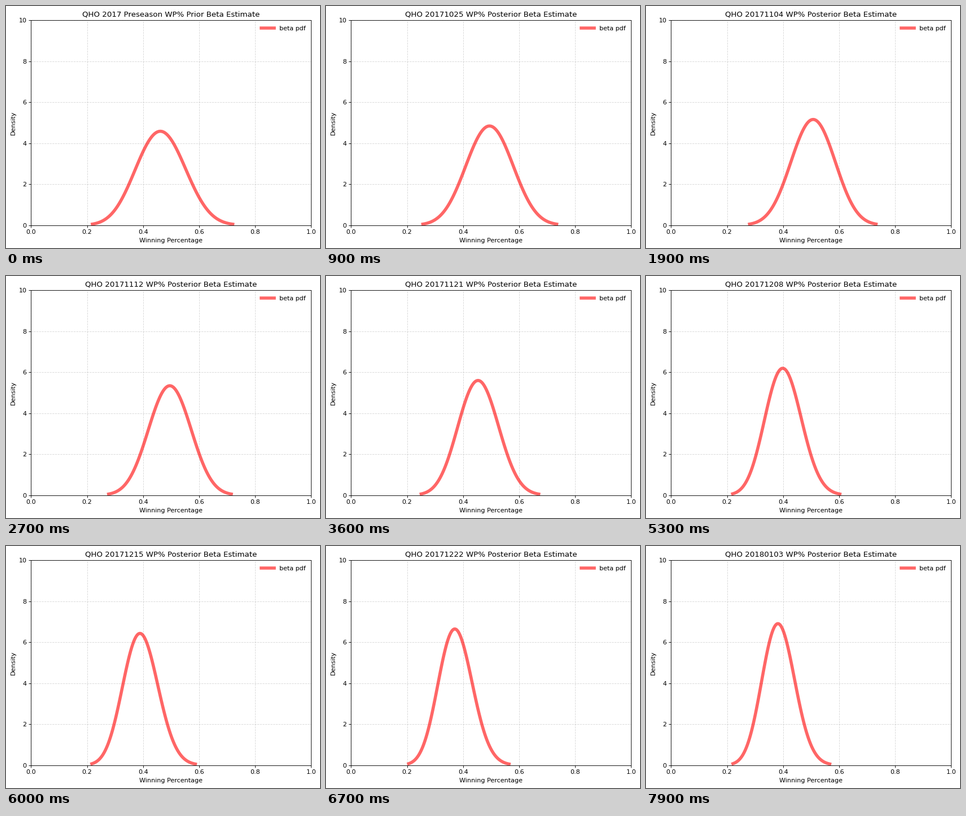
Animation, 556 px wide and 428 px high, one loop 8 s. Source, as a matplotlib script:

```python
import numpy as np
import matplotlib.pyplot as plt
from matplotlib.animation import FuncAnimation

W, H, DPI = 556, 428, 80
FRAMES, INTERVAL = 80, 100
TEAM = "QHO"
EVE = np.datetime64("2017-10-16")  # the day before opening night

# Prior strength, then game days counted from EVE
PRIOR_A, PRIOR_B = 15.45, 17.85
WINS = np.array([2, 5, 7, 10, 12, 19, 22, 49, 60, 68, 72, 76])
LOSSES = np.array([9, 14, 16, 20, 26, 28, 30, 33, 35, 37, 39, 41, 44,
                   46, 47, 51, 53, 54, 56, 58, 61, 65, 66, 71, 75, 78])

GRID = np.linspace(0, 1, 8001)[1:-1]
LOG_P, LOG_Q = np.log(GRID), np.log1p(-GRID)


def beta_curve(a, b, tail=0.001, points=100):
    """Beta density between its lower and upper tail quantiles."""
    logs = (a - 1) * LOG_P + (b - 1) * LOG_Q
    pdf = np.exp(logs - logs.max())
    pdf /= pdf.sum() * (GRID[1] - GRID[0])
    cdf = np.cumsum(pdf)
    cdf /= cdf[-1]
    lo, hi = np.interp([tail, 1 - tail], cdf, GRID)
    x = np.linspace(lo, hi, points)
    return x, np.interp(x, GRID, pdf)


def title_for(day):
    if day == 0:
        return f"{TEAM} 2017 Preseason WP% Prior Beta Estimate"
    date = str(EVE + day).replace("-", "")
    return f"{TEAM} {date} WP% Posterior Beta Estimate"


plt.rcParams["font.family"] = "DejaVu Sans"
fig = plt.figure(figsize=(W / DPI, H / DPI), dpi=DPI, facecolor="white")
ax = fig.add_axes([44.3 / W, 40.4 / H, 496 / W, 362.4 / H])
ax.set(xlim=(0, 1), ylim=(0, 10),
       xlabel="Winning Percentage", ylabel="Density")
ax.grid(linestyle="--", alpha=0.5)
line, = ax.plot([], [], "r-", lw=5, alpha=0.6, label="beta pdf")
ax.legend(loc="upper right", frameon=False)
title = ax.set_title(title_for(0))


def update(day):
    wins, losses = (WINS <= day).sum(), (LOSSES <= day).sum()
    line.set_data(*beta_curve(PRIOR_A + wins, PRIOR_B + losses))
    title.set_text(title_for(day))
    return line, title


anim = FuncAnimation(fig, update, frames=FRAMES, interval=INTERVAL,
                     repeat=True, repeat_delay=0, blit=False)
plt.show()
```
